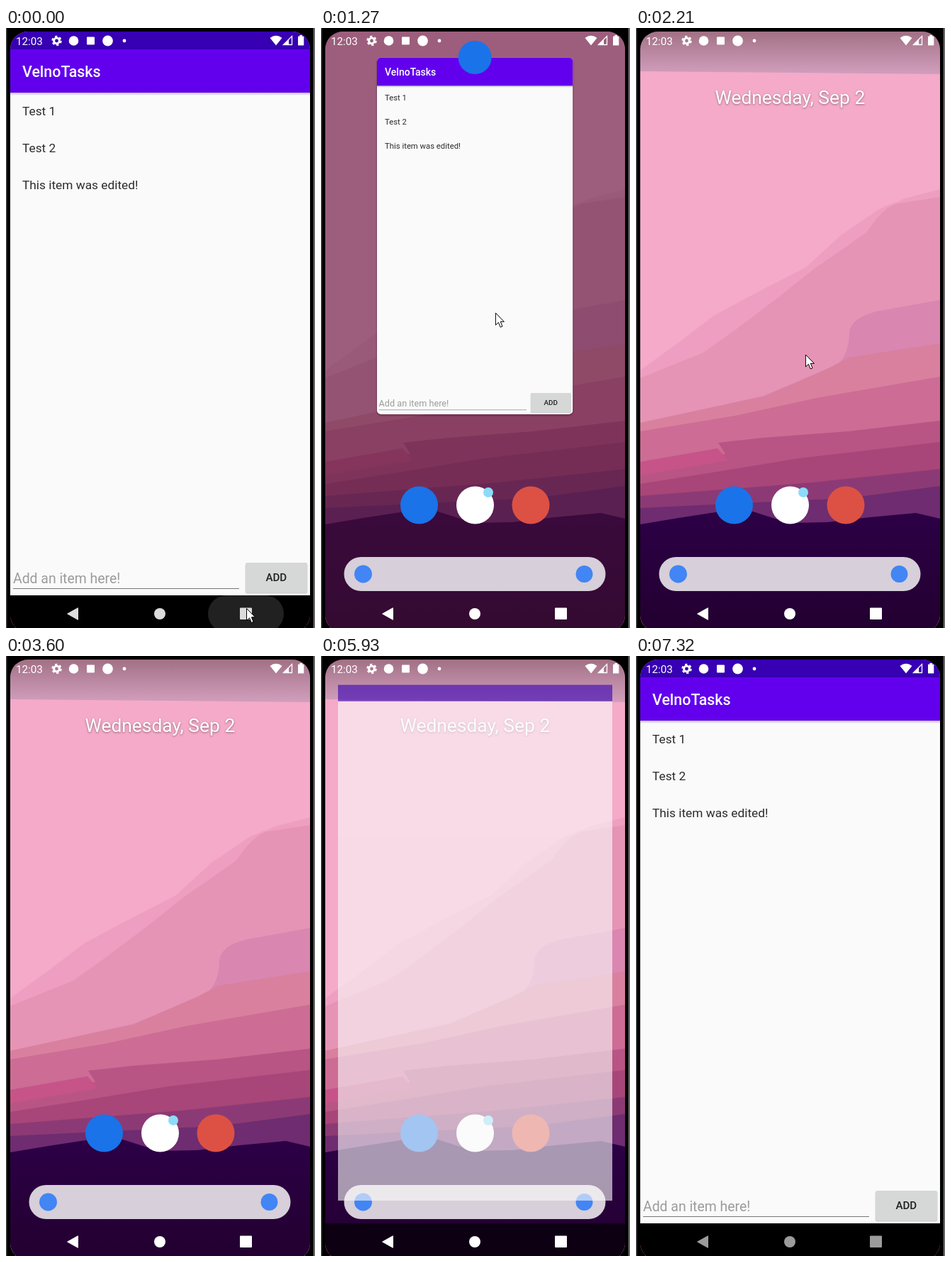
An HTML page for the animation above (8240 ms loop, 436 by 845 pixels).

```html
<!DOCTYPE html>
<html lang="en">
<head>
<meta charset="utf-8">
<title>Task list demo</title>
<style>
  html, body { margin: 0; width: 100%; height: 100%; overflow: hidden; background: #000; }
  svg { display: block; width: 100vw; height: 100vh; font-family: Roboto, sans-serif; }
</style>
</head>
<body>
<svg viewBox="0 0 436 845">
  <defs>
    <clipPath id="screen"><rect x="6" y="5" width="423" height="846" rx="25"/></clipPath>
    <clipPath id="card"><rect id="cardClip" x="6" y="30" width="423" height="769"/></clipPath>
    <linearGradient id="shade" x2="0" y2="1">
      <stop offset="0" stop-opacity=".34"/>
      <stop offset="1" stop-color="#8080a0" stop-opacity=".3"/>
    </linearGradient>
    <linearGradient id="barShadow" x2="0" y2="1">
      <stop offset="0" stop-opacity=".25"/><stop offset="1" stop-opacity="0"/>
    </linearGradient>
    <linearGradient id="hill" x2="0" y2="1">
      <stop offset="0" stop-color="#2d0047"/><stop offset="1" stop-color="#22002f"/>
    </linearGradient>
  </defs>

  <rect width="436" height="845"/>
  <path d="M.7 0V845" stroke="#444" stroke-width="1.4"/>
  <path d="M434.8 0V845" stroke="#666" stroke-width="2.4"/>

  <g clip-path="url(#screen)">
    <!-- wallpaper -->
    <rect x="6" y="5" width="423" height="846" fill="#f4aac8"/>
    <path fill="#ee9fc1" d="M6 482L60 443L110 405L160 378L240 337L290 291L345 254L380 240L429 227V845H6Z"/>
    <path fill="#e694b5" d="M6 493L95 457L140 425L200 380L250 340L325 288Q350 250 370 247L429 238V845H6Z"/>
    <path fill="#d986b1" d="M429 383L340 399Q302 408 301 430Q300 460 285 473L235 495L180 518L6 556V845H429Z"/>
    <path fill="#d9809f" d="M429 444L300 464L270 480L180 519L6 556V845H429Z"/>
    <path fill="#cd6c94" d="M429 491L260 520L140 546L6 568V845H429Z"/>
    <path fill="#b85584" d="M429 553L300 568L180 577L116 584L126 600L6 614V845H429Z"/>
    <path fill="#c65488" d="M6 611L115 592L130 609L6 630Z"/>
    <path fill="#a84679" d="M429 583L230 606L120 624L6 642V845H429Z"/>
    <path fill="#8c3a75" d="M429 621L250 640L6 659V845H429Z"/>
    <path fill="#6f2c70" d="M429 645L300 662L6 676V845H429Z"/>
    <path fill="url(#hill)" d="M6 699L60 690L112 682L135 678L165 681L215 697L270 696L330 689L395 683L429 691V851H6Z"/>

    <rect id="scrim" x="6" y="5" width="423" height="846" fill="#461432"/>
    <g id="home">
      <path fill="url(#shade)" d="M6 5H429V65L6 61Z"/>
      <text x="217.3" y="106.5" text-anchor="middle" font-size="26.4" fill="#fff"
        style="text-shadow:0 1px 3px #0006">Wednesday, Sep 2</text>
    </g>

    <g id="dock">
      <circle cx="138.5" cy="672" r="26.5" fill="#1a73e8"/>
      <circle cx="217.5" cy="672" r="26.5" fill="#fff"/>
      <circle cx="236" cy="654" r="7" fill="#8bdcf9"/>
      <circle cx="296" cy="672" r="26.5" fill="#dd5144"/>
      <rect x="32.5" y="745" width="369" height="48" rx="24" fill="#d7cfd9"/>
      <circle cx="59.5" cy="769" r="12.5" fill="#4285f4"/>
      <circle cx="371.5" cy="769" r="12" fill="#4285f4"/>
    </g>

    <!-- app window -->
    <g id="win">
      <rect id="cardShadow" x="4" y="31" width="427" height="772" rx="11"/>
      <rect id="bar" x="6" y="5" width="423" height="25.5" fill="#3700b3"/>
      <g clip-path="url(#card)">
        <rect x="6" y="30" width="423" height="769" fill="#fafafa"/>
        <g id="content">
          <rect x="6" y="91" width="423" height="4" fill="url(#barShadow)"/>
          <rect x="6" y="30" width="423" height="61" fill="#6200ee"/>
          <text x="23" y="69" font-size="21.4" font-weight="500" fill="#fff">VelnoTasks</text>
          <g font-size="17.3" fill="#2c2c2c">
            <text x="23" y="123">Test 1</text>
            <text x="23" y="175">Test 2</text>
            <text x="23" y="227">This item was edited!</text>
          </g>
          <text x="10" y="781.5" font-size="19.4" fill="#9c9c9c">Add an item here!</text>
          <path d="M10 789.5H329" stroke="#777"/>
          <rect x="337.5" y="754" width="88" height="42.5" rx="3" opacity=".17"/>
          <rect x="338" y="753" width="87" height="42" rx="2" fill="#d6d7d7"/>
          <text x="381.3" y="779.3" text-anchor="middle" font-size="15.1" font-weight="500" fill="#1f1f1f">ADD</text>
        </g>
      </g>
    </g>
    <circle id="badge" r="23.5" fill="#1a73e8"/>

    <!-- status bar -->
    <g fill="#fff">
      <text x="14" y="23.5" font-size="15.2">12:03</text>
      <circle cx="71.5" cy="18" r="3.9" fill="none" stroke="#fff" stroke-width="3"/>
      <circle cx="71.5" cy="18" r="6" fill="none" stroke="#fff" stroke-width="2.4" stroke-dasharray="3.2 3.083"/>
      <circle cx="95.5" cy="18" r="6.8"/>
      <rect x="114" y="12.5" width="11" height="11" rx="1"/>
      <circle cx="143.5" cy="18" r="7.4"/>
      <circle cx="167" cy="18" r="2.4"/>
      <path d="M372.5 14Q381 7.5 389.5 14L381 24.5Z"/>
      <path d="M391.5 23.5L403.5 11.5V23.5Z" fill="none" stroke="#fff" stroke-width="1.3"/>
      <path d="M391 24L399 16V24Z"/>
      <path d="M412 11.8H414.3V10H418V11.8H420.3V24.5H412Z"/>
    </g>

    <!-- navigation bar -->
    <rect id="navBack" x="6" y="799" width="423" height="52"/>
    <rect id="ripple" x="285" y="799" width="107" height="52" rx="26" ry="26" fill="#212121"/>
    <g id="nav">
      <path id="back" d="M87 825L101.3 817V833Z" stroke-width="1.4" stroke-linejoin="round"/>
      <circle cx="217" cy="825" r="8"/>
      <rect x="330" y="816.5" width="17" height="16.5" rx="1"/>
    </g>
  </g>

  <path id="cursor" d="M0 0V17L4 13.3L6.8 20L9.6 18.8L6.9 12.3H12Z" fill="#fff" stroke="#000" stroke-linejoin="round"/>
</svg>
<script>
const LOOP = 8240;
const el = id => document.getElementById(id);
const set = (id, attrs) => { for (const k in attrs) el(id).setAttribute(k, attrs[k]); };
const fade = (id, v) => set(id, { opacity: v });
const span = (t, a, b) => Math.min(1, Math.max(0, (t - a) / (b - a)));
const easeOut = p => 1 - (1 - p) ** 2.4;
const mix = (a, b, p) => a + (b - a) * p;

// Rows are [time, value, ...]; values run straight between rows.
function track(rows, t) {
  let i = 0;
  while (i < rows.length - 2 && t >= rows[i + 1][0]) i++;
  const a = rows[i], b = rows[i + 1], p = span(t, a[0], b[0]);
  return a.slice(1).map((v, k) => mix(v, b[k + 1], p));
}

const pointer = [
  [250, 339.5, 817.5], [550, 300, 610], [850, 252, 449], [1000, 252, 449],
  [1270, 246.5, 402.5], [1450, 225, 200], [1600, 207, 63], [1830, 206, 63],
  [1960, 220, 200], [2080, 247, 310], [2210, 239.5, 459.5], [2380, 224, 560],
  [2520, 185, 680], [2630, 156, 789], [2660, 156, 789], [2800, 290, 560], [2950, 437, 289]
];
const swipe = [[1000, 0, 1], [1270, -46, 1], [1450, -249, .8], [1620, -660, .2]];
const navGrey = [[90, 220], [300, 255], [6590, 255], [7180, 156]];

const CARD = { x: 79, y: 88.6, s: .6535 };
const START = { x: 57, y: 125, s: .759 };

function draw(t) {
  const launching = t >= 5850;
  const shrink = easeOut(span(t, 90, 600));
  const grow = easeOut(span(t, 5850, 6080));
  const from = launching ? START : CARD;
  const full = launching ? grow : 1 - shrink;
  const [lift, solid] = track(swipe, t);

  const x = mix(from.x, 6, full);
  const y = mix(from.y, 30, full) + (launching ? 0 : lift);
  const s = mix(from.s, 1, full);
  const alpha = launching ? mix(.15, 1, span(t, 5850, 6000)) : t < 1620 ? solid : 0;
  const round = launching ? 0 : shrink;

  set("win", { transform: `translate(${x} ${y}) scale(${s}) translate(-6 -30)`, opacity: alpha });
  set("cardClip", { rx: 9 * round });
  fade("cardShadow", .16 * round);
  fade("bar", launching ? 1 : 1 - span(t, 90, 350));
  fade("content", launching ? span(t, 6570, 6770) : 1);
  set("badge", { cx: x + 211.5 * s, cy: y, opacity: launching ? 0 : alpha * span(t, 350, 600) });

  fade("scrim", .5 * (1 - span(t, 1400, 1780)));
  fade("home", span(t, 1480, 1800));
  fade("dock", span(t, 150, 500));

  fade("navBack", launching ? grow : 1 - span(t, 90, 350));
  fade("ripple", 1 - span(t, 90, 400));
  const g = Math.round(track(navGrey, t)[0]);
  const grey = `rgb(${g},${g},${g})`;
  set("nav", { fill: grey });
  set("back", { stroke: grey });

  const [px, py] = track(pointer, t);
  set("cursor", { transform: `translate(${px} ${py})`, opacity: t < 2950 ? 1 : 0 });
}

const begin = performance.now();
function tick() {
  draw((performance.now() - begin) % LOOP);
  requestAnimationFrame(tick);
}
draw(0);
requestAnimationFrame(tick);
</script>
</body>
</html>
```
